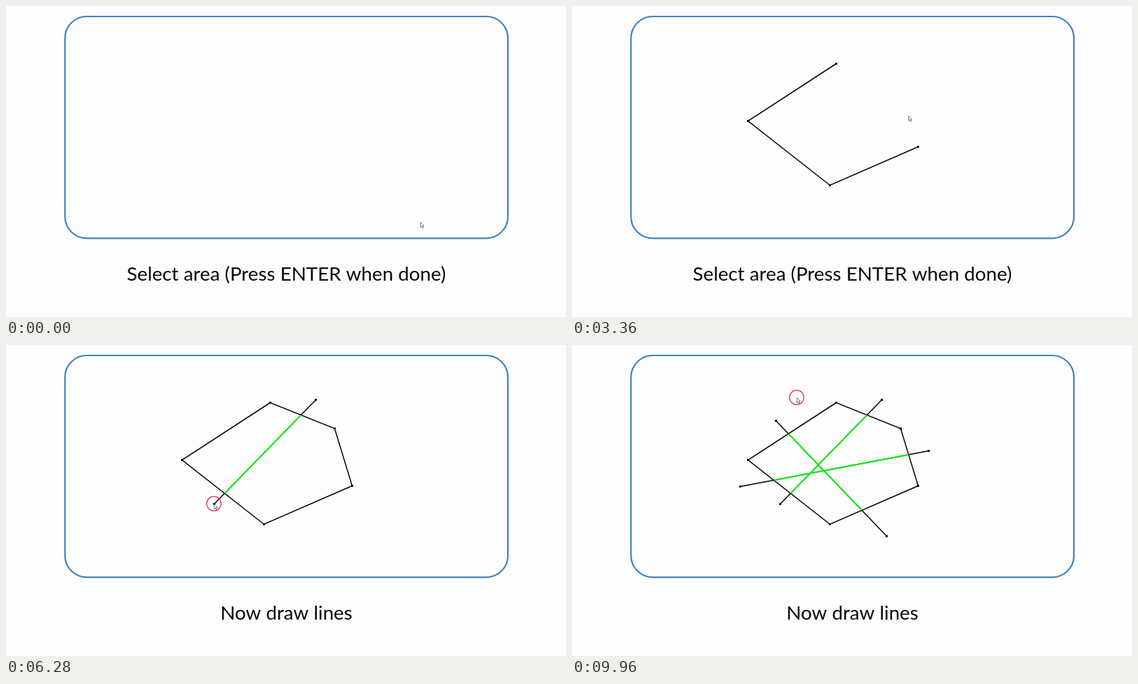
An HTML page with a canvas that plays this animation: 800 px wide and 445 px high, repeating every 10000 ms.

```html
<!DOCTYPE html>
<html lang="en">
<head>
<meta charset="utf-8">
<title>Lines in an area</title>
<style>
  html, body { margin: 0; width: 100%; height: 100%; overflow: hidden; background: #fdfdfe; }
  canvas { display: block; }
</style>
</head>
<body>
<canvas id="stage" width="800" height="445"></canvas>
<script>
const LOOP = 10000;
const ENTER = 4440;
const KEY_TIME = 1000;
const RING_TIME = 200;
const TRAVEL = 400;
const REST = 170;
const BLACK = '#000', GREEN = '#0cf00c';
const ctx = document.getElementById('stage').getContext('2d');

// Points clicked one after another at a steady pace
const clicks = (first, step, points) =>
  points.map(([x, y], i) => ({ time: first + i * step, x, y }));

const corners = clicks(920, 700,
  [[377, 82], [251, 164], [368, 256], [494, 201], [469, 119]]);
const lineClicks = clicks(5360, 760,
  [[442, 78], [297, 227], [291, 108], [449, 273], [509, 151], [240, 202], [321, 75]]);
const allClicks = [...corners, ...lineClicks];
const lineEnds = lineClicks.slice(0, 6);

const clamp = p => Math.max(0, Math.min(1, p));
const ease = p => p * p * (3 - 2 * p);
const made = (points, t) => points.filter(point => t >= point.time);

// The pointer glides to each point and rests there briefly before the click
function pointerAt(t) {
  let x = 592, y = 309;
  for (const click of allClicks) {
    const p = ease(clamp((t - click.time + REST + TRAVEL) / TRAVEL));
    x += (click.x - x) * p;
    y += (click.y - y) * p;
  }
  return [x, y];
}

function trace(points, close) {
  ctx.beginPath();
  for (const { x, y } of points) ctx.lineTo(x + 0.5, y + 0.5);
  if (close) ctx.closePath();
}

function stroke(color, width) {
  ctx.strokeStyle = color;
  ctx.lineWidth = width;
  ctx.stroke();
}

function dots(points) {
  ctx.fillStyle = BLACK;
  for (const { x, y } of points) ctx.fillRect(x - 1, y - 1, 3, 3);
}

function label(text, x, y, font, color) {
  ctx.font = font;
  ctx.fillStyle = color;
  ctx.fillText(text, x, y);
}

function drawArea(t) {
  const placed = made(corners, t);
  trace(placed, t >= ENTER);
  stroke(BLACK, 1.5);
  dots(placed);
}

function drawLines(t) {
  const placed = made(lineEnds, t);
  for (let i = 0; i + 1 < placed.length; i += 2) {
    const ends = placed.slice(i, i + 2);
    trace(ends);
    stroke(BLACK, 1.5);
    // The part inside the area turns green
    ctx.save();
    trace(corners, true);
    ctx.clip();
    trace(ends);
    stroke(GREEN, 1.9);
    ctx.restore();
  }
  dots(placed);
}

function drawPointer(t) {
  const [x, y] = pointerAt(t);
  if (allClicks.some(({ time }) => t >= time && t < time + RING_TIME)) {
    ctx.beginPath();
    ctx.arc(x, y, 10.3, 0, Math.PI * 2);
    stroke('#d8305c', 1.2);
  }
  ctx.save();
  ctx.translate(x + 0.4, y + 0.3);
  const arrow = new Path2D('M0 0V7.2L1.7 5.8L2.8 8.5L3.9 8L2.9 5.4H4.7Z');
  ctx.fillStyle = '#fff';
  ctx.fill(arrow);
  ctx.strokeStyle = '#55555c';
  ctx.lineWidth = 0.8;
  ctx.stroke(arrow);
  ctx.restore();
}

function draw(t) {
  ctx.fillStyle = '#fdfdfe';
  ctx.fillRect(0, 0, 800, 445);

  ctx.beginPath();
  ctx.roundRect(84.3, 15, 632.7, 317.4, 31);
  stroke('#4083c0', 2.2);

  drawArea(t);
  drawLines(t);

  ctx.textAlign = 'center';
  label(t < ENTER ? 'Select area (Press ENTER when done)' : 'Now draw lines',
    400.5, 393, '27.75px Lato, sans-serif', '#080808');

  if (t >= ENTER && t < ENTER + KEY_TIME) {
    ctx.fillStyle = '#666567';
    ctx.fillRect(375, 406, 51, 30);
    label('Ввод', 400.7, 427, '17px "Liberation Sans", sans-serif', '#fff');
  }
  drawPointer(t);
}

const begin = performance.now();
function tick() {
  draw((performance.now() - begin) % LOOP);
  requestAnimationFrame(tick);
}
tick();
</script>
</body>
</html>
```
